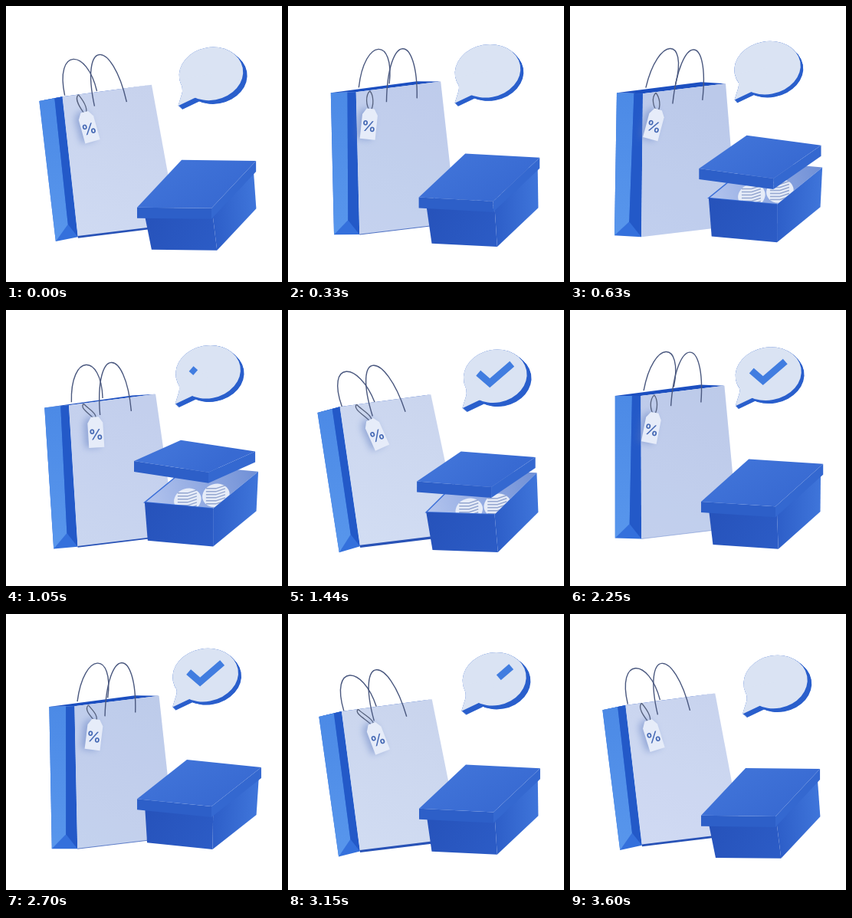
An HTML page with a canvas that plays this animation: 360x360 px, repeating every 3630 ms.

```html
<!DOCTYPE html>
<html lang="en">
<head>
<meta charset="utf-8">
<title>Shopping</title>
<style>
html, body { margin: 0; width: 100%; height: 100%; overflow: hidden; background: #fff; }
canvas { display: block; width: 360px; height: 360px; }
</style>
</head>
<body>
<canvas id="stage" width="360" height="360"></canvas>
<script>
const ctx = document.getElementById('stage').getContext('2d');
const LOOP = 3630;
const TURN = 2 * Math.PI;

const lerp = (a, b, f) => a + (b - a) * f;
const progress = (t, from, to) => Math.min(1, Math.max(0, (t - from) / (to - from)));
const smooth = (t, from, to) => { const x = progress(t, from, to); return x * x * (3 - 2 * x); };
const add = ([x, y], [dx, dy], scale = 1) => [x + dx * scale, y + dy * scale];
const between = (p, q, f) => [lerp(p[0], q[0], f), lerp(p[1], q[1], f)];

// Corners: front left, front right, back right, back left.
function quad(corner, width, depth, scale = 1) {
  const right = add(corner, width, scale);
  return [corner, right, add(right, depth, scale), add(corner, depth, scale)];
}

function poly(points, fill) {
  ctx.beginPath();
  points.forEach(p => ctx.lineTo(...p));
  ctx.closePath();
  ctx.fillStyle = fill;
  ctx.fill();
}

function stroke(color, width) {
  ctx.strokeStyle = color;
  ctx.lineWidth = width;
  ctx.stroke();
}

function line(points, color, width) {
  ctx.beginPath();
  points.forEach(p => ctx.lineTo(...p));
  stroke(color, width);
}

function curve(from, c1, c2, to, color, width) {
  ctx.beginPath();
  ctx.moveTo(...from);
  ctx.bezierCurveTo(...c1, ...c2, ...to);
  stroke(color, width);
}

function gradient(p, q, from, to) {
  const g = ctx.createLinearGradient(...p, ...q);
  g.addColorStop(0, from);
  g.addColorStop(1, to);
  return g;
}

function drawHandle(left, right, lean, controlY) {
  curve(left, [left[0] + lean, controlY], [right[0] + lean, controlY], right, '#4a587f', 1.4);
}

function drawTag(phase, upright, hook) {
  const angle = (40 * upright - 25) * Math.PI / 180;
  const x = 111.5 + 6 * Math.cos(phase - 0.64 * TURN);
  const y = 157.5 - 4 * Math.sin(phase);
  const hole = [x + 16 * Math.sin(angle), y - 16 * Math.cos(angle)];
  for (const bend of [-6, 5]) {
    curve(hook, add(hook, [bend, 6]), add(hole, [bend, -8]), hole, '#55607c', 1.3);
  }

  ctx.save();
  ctx.translate(x, y);
  ctx.rotate(angle);
  ctx.shadowColor = 'rgba(90, 120, 190, 0.5)';
  ctx.shadowBlur = 10;
  ctx.shadowOffsetX = -5;
  poly([[-10, -12], [-5, -20], [5, -20], [10, -12], [10, 20], [-10, 20]], '#e6ecf9');
  ctx.shadowColor = 'transparent';
  ctx.fillStyle = '#4468b4';
  ctx.font = '600 19px Inter, sans-serif';
  ctx.textAlign = 'center';
  ctx.textBaseline = 'middle';
  ctx.fillText('%', 0, 4);
  ctx.restore();
}

function drawBag(phase, u) {
  const bob = -9.5 * Math.sin(phase);
  const left = [67 + 28 * u, 117 + 5 * u + bob];
  const right = add(left, [119 - 11 * u, 3 * u - 16]);
  const back = add(right, [-29 - 3 * u, 6 - 8 * u]);
  const side = add(left, [-29 - 5 * u, 8 - 9 * u]);
  const bottomLeft = add(left, [27 - 29 * u, 182 + 5 * u]);
  const bottomRight = add(bottomLeft, [131 - 6 * u, u - 16]);
  const bottomSide = add(bottomLeft, [-27 - 8 * u, 8 - 10 * u]);
  const foldTop = between(side, left, 0.66);
  const foldBase = add(between(bottomSide, bottomLeft, 0.55), [0, -19]);

  const foot = f => add(between(left, right, f), [0, 18]);
  const behind = p => add(p, [5 * u - 40, -12 - 9 * u]);
  const lean = 38 * u - 28;

  poly([side, left, right, back], '#1c4fc0');
  drawHandle(behind(foot(0.36)), behind(foot(0.72)), lean + 6, 57 - 10 * u + bob);
  poly([side, left, bottomLeft, bottomSide], '#3470dc');
  poly([side, foldTop, foldBase, bottomSide], gradient(side, bottomSide, '#4c8ae6', '#5896ec'));
  poly([foldTop, left, bottomLeft, foldBase], '#2359c8');
  const front = [left, right, bottomRight, bottomLeft];
  poly(front, gradient(right, bottomLeft, '#cbd5ee', '#d3ddf3'));
  poly(front, `rgba(120, 148, 212, ${0.2 * u})`);
  line([bottomLeft, bottomRight], '#2852b6', 3.5 * (1 - u));
  drawHandle(foot(0.36), foot(0.72), lean, 42 + bob);
  drawTag(phase, u, [89 + 23 * u, 114 + 7 * u + bob]);
}

function drawShoe([x, y]) {
  ctx.beginPath();
  ctx.ellipse(x, y, 18, 15, -0.3, 0, TURN);
  ctx.fillStyle = '#e6ecf8';
  ctx.fill();
  for (let dy = -10; dy <= 10; dy += 4) {
    line([[x - 13, y + dy + 1], [x, y + dy + 1], [x + 12, y + dy - 3]], '#94a6d0', 1.4);
  }
}

function drawBox(t, high) {
  const width = [97, 1 + 9 * high];
  const depth = [58 + 7 * high, 11 * high - 62];
  const rim = quad([180 + high, 269 - 21 * high], width, depth, 0.92);
  const base = quad([190 - 6 * high, 318 - 20 * high], width, depth, 0.88);
  const open = smooth(t, 200, 900) * (1 - smooth(t, 1200, 1900));
  const tilt = 28 * open * smooth(t, 0, 1300);

  if (open > 0) {
    poly(rim, gradient(rim[0], rim[2], '#b4c5ee', '#6f8fd6'));
    ctx.save();
    ctx.clip();
    drawShoe(add(rim[0], [56, -3]));
    drawShoe(add(rim[0], [93, -9]));
    ctx.restore();
    line([rim[1], rim[0], rim[3]], '#3b6fd8', 1.5);
  }
  poly([rim[0], rim[1], base[1], base[0]], gradient(rim[0], base[1], '#2652ba', '#2c5cc6'));
  poly([rim[1], rim[2], base[2], base[1]], gradient(rim[1], base[2], '#2d5ec8', '#3f75da'));

  // The lid rises and tips back at its hinge side.
  const top = quad(
    [171 - 4 * open, 263 - 22 * high - 47 * open],
    add(width, [0, 6], open),
    add(depth, [-3 * open, tilt]));
  const low = top.map(p => add(p, [0, 14]));
  poly([top[0], top[1], low[1], low[0]], '#2d5fc8');
  poly([top[1], top[2], low[2], low[1]], '#3468d0');
  poly(top, gradient(top[3], top[1], '#4073d8', '#386ad2'));
}

function bubbleShape(rx, fill) {
  ctx.fillStyle = fill;
  ctx.beginPath();
  ctx.ellipse(0, 0, rx, 34.5, -0.18, 0, TURN);
  ctx.fill();
  ctx.beginPath();
  ctx.moveTo(-41, 8);
  ctx.quadraticCurveTo(-36, 19, -38, 26);
  ctx.lineTo(-43, 42);
  ctx.lineTo(-22, 32);
  ctx.quadraticCurveTo(-18, 29, -4, 34);
  ctx.lineTo(0, 0);
  ctx.fill();
}

function drawCheck(t) {
  const start = progress(t, 2900, 3300);
  const end = progress(t, 1000, 1400);
  if (end <= start) return;
  const tail = [-22, -4], knee = [-7, 9], tip = [22, -16];
  const kneeAt = 0.34;
  const at = f => f < kneeAt
    ? between(tail, knee, f / kneeAt)
    : between(knee, tip, (f - kneeAt) / (1 - kneeAt));
  const path = [at(start), at(end)];
  if (start < kneeAt && end > kneeAt) path.splice(1, 0, knee);
  line(path, '#417de0', 9);
}

function drawBubble(t, upright, high) {
  const rx = 41.5 + 2 * upright;
  ctx.save();
  ctx.translate(270.5 - 13 * upright, 88.5 - 9 * high);
  for (let f = 1; f > 0; f -= 0.1) {
    ctx.save();
    ctx.translate(f * (6 - 2.5 * upright), f * (5 - upright));
    bubbleShape(rx, '#2a5fcc');
    ctx.restore();
  }
  bubbleShape(rx, '#dae3f3');
  drawCheck(t);
  ctx.restore();
}

function draw(now) {
  const t = now % LOOP;
  const phase = t / LOOP * 2 * TURN; // two sways per loop
  const wave = offset => 0.5 + 0.5 * Math.cos(phase - offset * TURN);
  const upright = wave(0.34);
  const high = wave(0.46);

  ctx.clearRect(0, 0, 360, 360);
  drawBag(phase, upright);
  drawBox(t, high);
  drawBubble(t, upright, high);
}

const began = performance.now();
function frame() {
  draw(performance.now() - began);
  requestAnimationFrame(frame);
}
frame();
</script>
</body>
</html>
```
